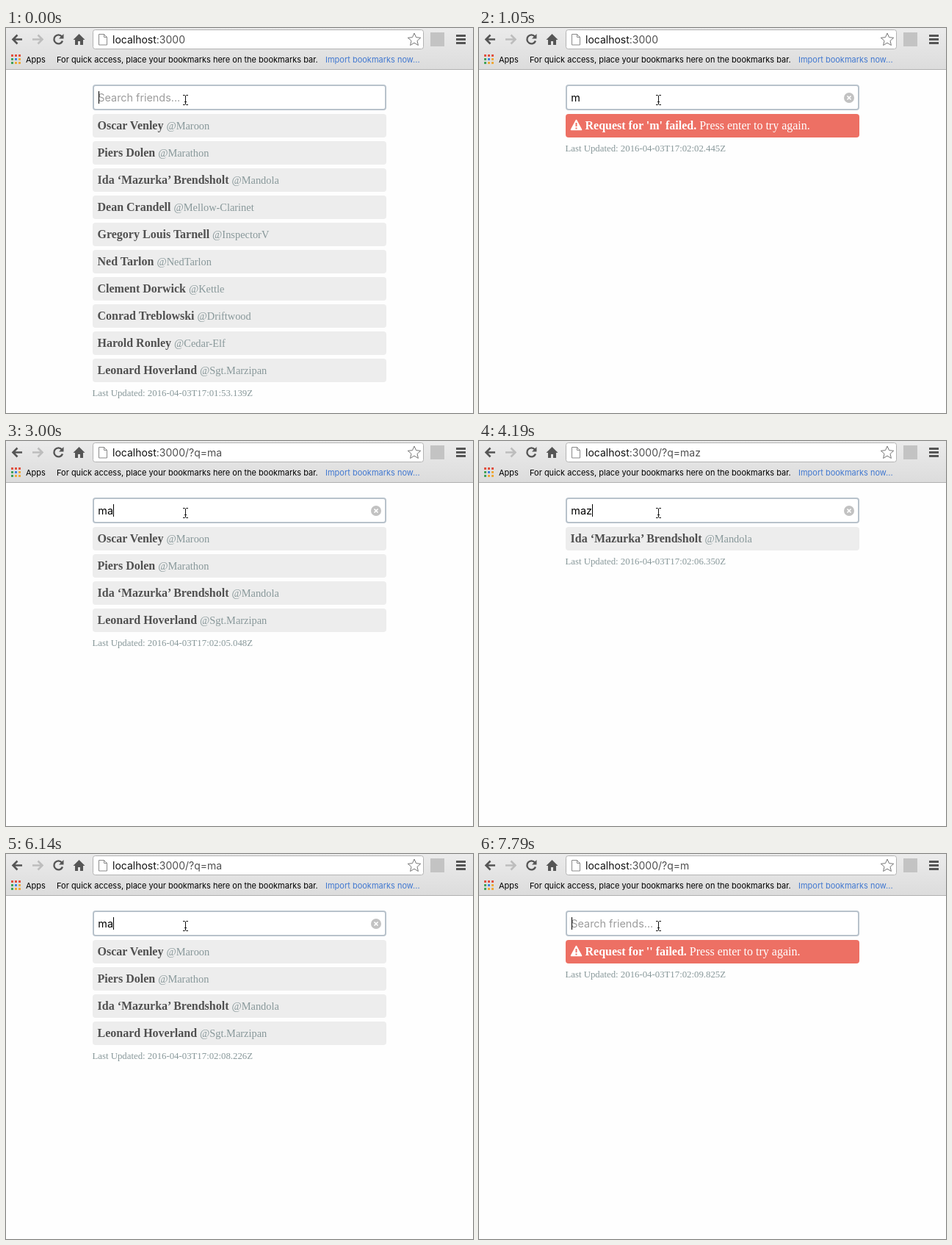
Write an HTML page that moves like this. It is 636 px wide and 524 px high and loops after 8000 ms.

```html
<!DOCTYPE html>
<html lang="en">
<head>
<meta charset="utf-8">
<title>Friend search</title>
<style>
  html, body { margin: 0; width: 100%; height: 100%; overflow: hidden; background: #fefefe; }
  svg { display: block; }
  .ui { font-family: Inter, Roboto, sans-serif; }
  .page { font: 16px "Liberation Serif", "Times New Roman", serif; }
  .name { font-weight: bold; fill: #505050; }
  .soft { fill: #88989a; }
</style>
</head>
<body>
<svg width="636" height="524" viewBox="0 0 636 524">
  <defs>
    <linearGradient id="bar" x2="0" y2="1">
      <stop stop-color="#ebebeb"/><stop offset="1" stop-color="#dcdcdc"/>
    </linearGradient>
  </defs>
  <rect width="636" height="524" fill="#fefefe"/>
  <rect width="636" height="56" fill="url(#bar)"/>
  <rect y="56" width="636" height="1" fill="#b0b0b0"/>
  <rect x="118.5" y="2.5" width="450" height="26" rx="3" fill="#fff" stroke="#b3b3b3"/>

  <!-- toolbar icons -->
  <g fill="none" stroke="#555" stroke-width="2.6">
    <path d="M22 15.5H10M15.5 9.5l-6 6 6 6"/>
    <path d="M36 15.5H48M43.5 9.5l6 6-6 6" stroke="#bdbdbd"/>
    <path d="M76 11.5A6 6 0 1 0 77 17.5" stroke-width="2.4"/>
  </g>
  <g fill="#555">
    <path d="M78.5 8v6.5H72z"/>
    <path d="M99.5 8l8 8h-2.5v7h-4v-5h-3v5h-4v-7h-2.5z"/>
    <path d="M613 9h13v3h-13zM613 14h13v3h-13zM613 19h13v3h-13z"/>
  </g>
  <path d="M126.5 8.5h7l4 4v10.500h-11zM133.5 8.5v4h4" fill="#fff" stroke="#8a8a8a"/>
  <path d="M556 7l2.500 5.700 6.200.6-4.700 4.100 1.400 6.100-5.400-3.300-5.400 3.300 1.400-6.100-4.700-4.100 6.200-.6z" fill="#fff" stroke="#777"/>
  <rect x="578" y="6" width="19" height="19" fill="#c3c3c3"/>
  <g id="apps"></g>

  <g class="ui" font-size="11">
    <text x="27" y="47">Apps</text>
    <text x="69" y="47">For quick access, place your bookmarks here on the bookmarks bar.</text>
    <text x="435" y="47" fill="#4178d0">Import bookmarks now...</text>
  </g>
  <text class="ui" x="145" y="21" font-size="14" fill="#111">localhost<tspan id="url" fill="#505050"></tspan></text>

  <!-- search box -->
  <rect x="119" y="78" width="398" height="33" rx="3" fill="#fff" stroke="#b8c2cb" stroke-width="2"/>
  <text id="query" class="ui" x="125.3" y="100" font-size="14.4"></text>
  <g id="clear">
    <circle cx="504" cy="95" r="7" fill="#c2c2c2"/>
    <path d="M501.5 92.5l5 5m0-5l-5 5" stroke="#fff" stroke-width="1.7"/>
  </g>
  <rect id="caret" y="86" width="1" height="17"/>
  <g id="results" class="page"></g>
  <path d="M241 91.500h2.500l1 1 1-1h2.500M244.500 92v12M241 104.500h2.500l1-1 1 1h2.500M243 100.500h3" fill="none" stroke="#111"/>
</svg>
<script>
const $ = id => document.getElementById(id);

const friends = [
  ["Oscar Venley", "@Maroon"],
  ["Piers Dolen", "@Marathon"],
  ["Ida ‘Mazurka’ Brendsholt", "@Mandola"],
  ["Dean Crandell", "@Mellow-Clarinet"],
  ["Gregory Louis Tarnell", "@InspectorV"],
  ["Ned Tarlon", "@NedTarlon"],
  ["Clement Dorwick", "@Kettle"],
  ["Conrad Treblowski", "@Driftwood"],
  ["Harold Ronley", "@Cedar-Elf"],
  ["Leonard Hoverland", "@Sgt.Marzipan"]
];

// start, typed text, address query, view, view's query, last update
const scenes = [
  [0, "", "", "list", "", "01:53.139"],
  [150, "m", "", "dim", "", "01:53.139"],
  [300, "m", "", "error", "m", "02:02.445"],
  [600, "m", "", "warning", "m", "02:02.445"],
  [2850, "ma", "", "blank", "", "02:02.445"],
  [3000, "ma", "ma", "list", "ma", "02:05.048"],
  [4190, "maz", "maz", "list", "maz", "02:06.350"],
  [6140, "ma", "ma", "list", "ma", "02:08.226"],
  [6740, "m", "ma", "dim", "ma", "02:08.226"],
  [7040, "m", "m", "list", "m", "02:09.021"],
  [7490, "", "m", "dim", "m", "02:09.021"],
  [7790, "", "m", "warning", "", "02:09.825"]
];
const caretOff = [[1050, 1650], [2100, 2550], [3450, 3900], [4790, 5240], [5690, 6140], [6590, 6740]];
const caretX = [126, 139, 146, 154];

const row = (i, fill, content) =>
  `<rect x="118" y="${117 + 37 * i}" width="400" height="32" rx="4" fill="${fill}"/>${content}`;

const friendRow = ([name, handle], i, dim) => row(i, "#ededed",
  `<text x="124.5" y="${138 + 37 * i}" opacity="${dim ? .5 : 1}"><tspan class="name">${name}</tspan>
   <tspan class="soft" font-size="14.4">${handle}</tspan></text>`);

const errorRow = (query, icon) => row(0, "#ed7064",
  (icon ? `<path d="M132.5 125.5l7 13h-14z" fill="#fff" stroke="#fff" stroke-width="1.6" stroke-linejoin="round"/>
    <path d="M132.5 129v5m0 1.5v2" stroke="#ed7064" stroke-width="2"/>` : "") +
  `<text x="${icon ? 144.5 : 140}" y="138" fill="#fff"><tspan font-weight="bold">Request for '${query}' failed.</tspan>
   Press enter to try again.</text>`);

function results(view, query, stamp) {
  let rows = [];
  if (view === "error" || view === "warning") rows = [errorRow(query, view === "warning")];
  else if (view !== "blank") rows = friends
    .filter(f => f.join(" ").toLowerCase().includes(query))
    .map((f, i) => friendRow(f, i, view === "dim"));
  return rows.join("") + `<text class="soft" x="117.5" y="${131 + 37 * rows.length}" font-size="12.8">` +
    `Last Updated: 2016-04-03T17:${stamp}Z</text>`;
}

let shown;
function show(scene) {
  const [, text, address, view, query, stamp] = scene;
  $("url").textContent = ":3000" + (address && "/?q=" + address);
  $("query").textContent = text || "Search friends...";
  $("query").setAttribute("fill", text ? "#000" : "#9c9c9c");
  $("clear").style.display = text ? "" : "none";
  $("caret").setAttribute("x", caretX[text.length]);
  $("results").innerHTML = results(view, query, stamp);
  shown = scene;
}

function frame() {
  const t = performance.now() % 8000;
  const scene = scenes.findLast(s => s[0] <= t);
  if (scene !== shown) show(scene);
  $("caret").style.display = caretOff.some(([a, b]) => t >= a && t < b) ? "none" : "";
  requestAnimationFrame(frame);
}

const red = "#e0503f", yellow = "#eda93b", green = "#41a35a", blue = "#4285e0";
$("apps").innerHTML = [red, red, red, green, blue, yellow, green, yellow, yellow].map((c, i) =>
  `<rect x="${7 + i % 3 * 5}" y="${36 + (i / 3 | 0) * 5}" width="3" height="3" fill="${c}"/>`).join("");
frame();
</script>
</body>
</html>
```
